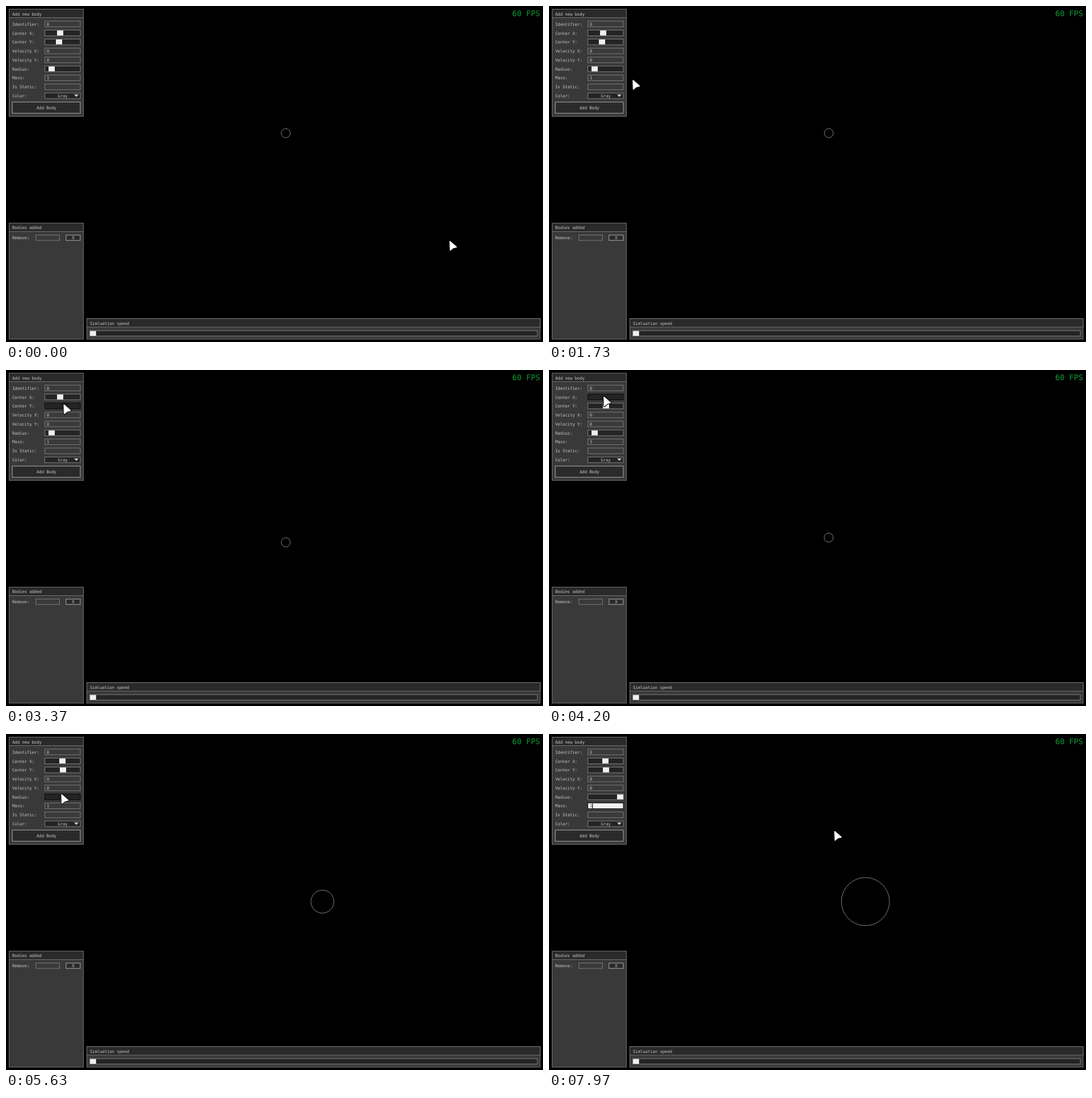
An HTML page for the animation above (8 s loop, 947 by 592 pixels).

```html
<!DOCTYPE html>
<html lang="en">
<head>
<meta charset="utf-8">
<title>Add new body</title>
<style>
html, body { margin: 0; width: 100%; height: 100%; overflow: hidden; background: #000; }
svg { display: block; width: 947px; height: 592px; }
text { font: 7.5px "DejaVu Sans Mono", monospace; letter-spacing: -.2px; fill: #c2c2c2; stroke: none; white-space: pre; }
.mid { text-anchor: middle; }
.fps { font-size: 13.6px; letter-spacing: 0; fill: #0b9a35; }
.panel { fill: #393939; stroke: #737378; }
.bar { fill: #2a2a2a; stroke: #737378; }
.box { fill: #3a3a3a; stroke: #7d7d7d; }
.dark { fill: #242424; stroke: #808080; }
.button { fill: #2a2a2a; stroke: #858585; stroke-width: 1.5; }
.slider { stroke: #808080; color: #f0f0f0; }
.slider .track { fill: #242424; }
.knob { fill: currentColor; stroke: none; }

.pointer, .slider, .knob, .body, .edit, .add { animation: 8s linear infinite; }
.slider, .edit, .add { animation-timing-function: step-end; }
.pointer { animation-name: point; }
.body { fill: none; stroke: #a4a4a4; stroke-width: .8; animation-name: body; }
.sx { animation-name: stateX; }
.sy { animation-name: stateY; }
.sr { animation-name: stateR; }
.sx .knob { animation-name: knobX; }
.sy .knob { animation-name: knobY; }
.sr .knob { animation-name: knobR; }
.edit { animation-name: edit; }
.add { animation-name: add; }

@keyframes point {
  0%, .4% { transform: translate(782px, 414px); animation-timing-function: ease-in-out; }
  9.6%, 12.8% { transform: translate(868px, 402px); animation-timing-function: ease-in; }
  15.3% { transform: translate(600px, 315px); }
  17.3% { transform: translate(270px, 225px); }
  18.5% { transform: translate(122px, 178px); }
  20% { transform: translate(127px, 112px); }
  21.6% { transform: translate(148px, 130.5px); }
  22.9% { transform: translate(124px, 122px); }
  26.5% { transform: translate(101px, 78px); }
  28.5% { transform: translate(95px, 62px); }
  30.4% { transform: translate(94px, 60px); }
  34.5% { transform: translate(93.5px, 60px); }
  40% { transform: translate(102.5px, 60px); }
  43.7%, 45% { transform: translate(100.5px, 61px); }
  48.5% { transform: translate(97px, 50px); }
  51%, 52.5% { transform: translate(96px, 47px); }
  58% { transform: translate(100.3px, 42px); }
  61% { transform: translate(100px, 37px); }
  64% { transform: translate(100px, 45px); }
  65% { transform: translate(99px, 63px); }
  67.5% { transform: translate(81px, 109px); }
  70.4% { transform: translate(97.3px, 106px); }
  75%, 76% { transform: translate(126px, 110px); }
  79% { transform: translate(106px, 125px); }
  82% { transform: translate(102.5px, 127px); }
  83.5% { transform: translate(103px, 127px); }
  85.6% { transform: translate(124px, 129px); }
  88% { transform: translate(340px, 151px); }
  90.3% { transform: translate(517px, 172px); }
  92.8%, 100% { transform: translate(503px, 171px); }
}
@keyframes body {
  0%, 34.5% { cx: 493.4px; cy: 224px; r: 8px; }
  40% { cx: 493.4px; cy: 315px; r: 8px; }
  43.7% { cx: 493.4px; cy: 295.3px; r: 8px; }
  52.5% { cx: 493px; cy: 295.3px; r: 8px; }
  58% { cx: 559.5px; cy: 295.3px; r: 8px; }
  61%, 67.5% { cx: 558px; cy: 295.3px; r: 8px; }
  70.4% { cx: 558px; cy: 295.3px; r: 20.3px; }
  75%, 100% { cx: 558px; cy: 295.3px; r: 42.4px; }
}
@keyframes knobX {
  0%, 52.5% { transform: none; }
  58%, 100% { transform: translateX(4px); }
}
@keyframes knobY {
  0%, 34.5% { transform: none; }
  40% { transform: translateX(9px); }
  43.7%, 100% { transform: translateX(7px); }
}
@keyframes knobR {
  0%, 67.5% { transform: none; }
  70.4% { transform: translateX(16px); }
  75%, 100% { transform: translateX(45px); }
}
@keyframes stateX {
  0%, 64%, 100% { stroke: #808080; color: #f0f0f0; }
  48.3% { stroke: #e6e6e6; color: #acacac; }
  51% { stroke: #080808; color: #202020; }
}
@keyframes stateY {
  0%, 47.5%, 65.4%, 100% { stroke: #808080; color: #f0f0f0; }
  27.8%, 45%, 64.8% { stroke: #e6e6e6; color: #acacac; }
  34.5% { stroke: #080808; color: #202020; }
}
@keyframes stateR {
  0%, 77.5%, 100% { stroke: #808080; color: #f0f0f0; }
  67.2%, 76% { stroke: #e6e6e6; color: #acacac; }
  67.5% { stroke: #080808; color: #202020; }
}
@keyframes edit {
  0% { opacity: 0; }
  79.4%, 100% { opacity: 1; }
}
@keyframes add {
  0%, 18.8%, 100% { stroke: #858585; }
  18.4% { stroke: #e6e6e6; }
}
</style>
</head>
<body>
<svg viewBox="0 0 947 592">
  <text class="fps" x="892.8" y="17.8">60 FPS</text>
  <circle class="body" cx="493.4" cy="224" r="8"/>

  <rect class="panel" x="5.5" y="5.5" width="131" height="189"/>
  <rect class="bar" x="5.5" y="5.5" width="131" height="15"/>
  <text x="11" y="16.7">Add new body</text>

  <text x="11" y="34.7">Identifier:</text>
  <rect class="box" x="68.5" y="26.7" width="62.5" height="10"/>
  <text x="71.7" y="34.7">0</text>

  <text x="11" y="50.5">Center X:</text>
  <g class="slider sx">
    <rect class="track" x="68.5" y="42.5" width="62.5" height="10"/>
    <rect class="knob" x="90" y="43.2" width="11" height="8.6"/>
  </g>

  <text x="11" y="66.2">Center Y:</text>
  <g class="slider sy">
    <rect class="track" x="68.5" y="58.3" width="62.5" height="10"/>
    <rect class="knob" x="88" y="59" width="11" height="8.6"/>
  </g>

  <text x="11" y="82">Velocity X:</text>
  <rect class="box" x="68.5" y="74.2" width="62.5" height="10"/>
  <text x="71.7" y="82">0</text>

  <text x="11" y="97.8">Velocity Y:</text>
  <rect class="box" x="68.5" y="90" width="62.5" height="10"/>
  <text x="71.7" y="97.8">0</text>

  <text x="11" y="113.6">Radius:</text>
  <g class="slider sr">
    <rect class="track" x="68.5" y="105.8" width="62.5" height="10"/>
    <rect class="knob" x="75" y="106.5" width="11" height="8.6"/>
  </g>

  <text x="11" y="129.4">Mass:</text>
  <rect class="box" x="68.5" y="121.6" width="62.5" height="10"/>
  <text x="71.7" y="129.4">1</text>
  <g class="edit">
    <rect x="68.5" y="121.6" width="62.5" height="10" fill="#f2f2f2" stroke="#0a0a0a"/>
    <text x="71.7" y="129.4" style="fill:#666">1</text>
    <rect x="76" y="122.5" width="1.3" height="8.4" fill="#111"/>
  </g>

  <text x="11" y="145.2">Is Static:</text>
  <rect class="box" x="68.5" y="137.4" width="62.5" height="10"/>

  <text x="11" y="161">Color:</text>
  <rect class="dark" x="68.5" y="153.2" width="62.5" height="10"/>
  <text class="mid" x="100" y="161">Gray</text>
  <path d="M120 155.7h8l-4 4.6z" fill="#c8c8c8"/>

  <rect class="button add" x="11" y="169.3" width="120" height="19.7"/>
  <text class="mid" x="71.3" y="182.2">Add Body</text>

  <rect class="panel" x="5.5" y="382.5" width="131" height="204.5"/>
  <rect class="bar" x="5.5" y="382.5" width="131" height="15"/>
  <text x="11" y="393.3">Bodies added</text>
  <text x="11" y="411.2">Remove:</text>
  <rect class="box" x="52.7" y="403.5" width="41.8" height="9.5"/>
  <rect class="button" x="105.8" y="403.6" width="25" height="9.4"/>
  <text class="mid" x="118.3" y="411.2">X</text>

  <rect class="panel" x="142.5" y="550.8" width="799.5" height="36.2"/>
  <rect class="bar" x="142.5" y="550.8" width="799.5" height="15"/>
  <text x="148" y="561.6">Simluation speed</text>
  <rect class="dark" x="147.7" y="572" width="789.3" height="9.5"/>
  <rect x="148.2" y="572.6" width="10.6" height="8.4" fill="#f0f0f0"/>

  <g class="pointer" stroke-linejoin="round">
    <path id="arrow" d="M1 1L12.2 10.6L6.3 12L1.6 16.2z" fill="#000" stroke="#000" stroke-width="4.2"/>
    <path d="M1 1L12.2 10.6L6.3 12L1.6 16.2z" fill="#fff" stroke="#fff" stroke-width="1.8"/>
  </g>
</svg>
</body>
</html>
```
